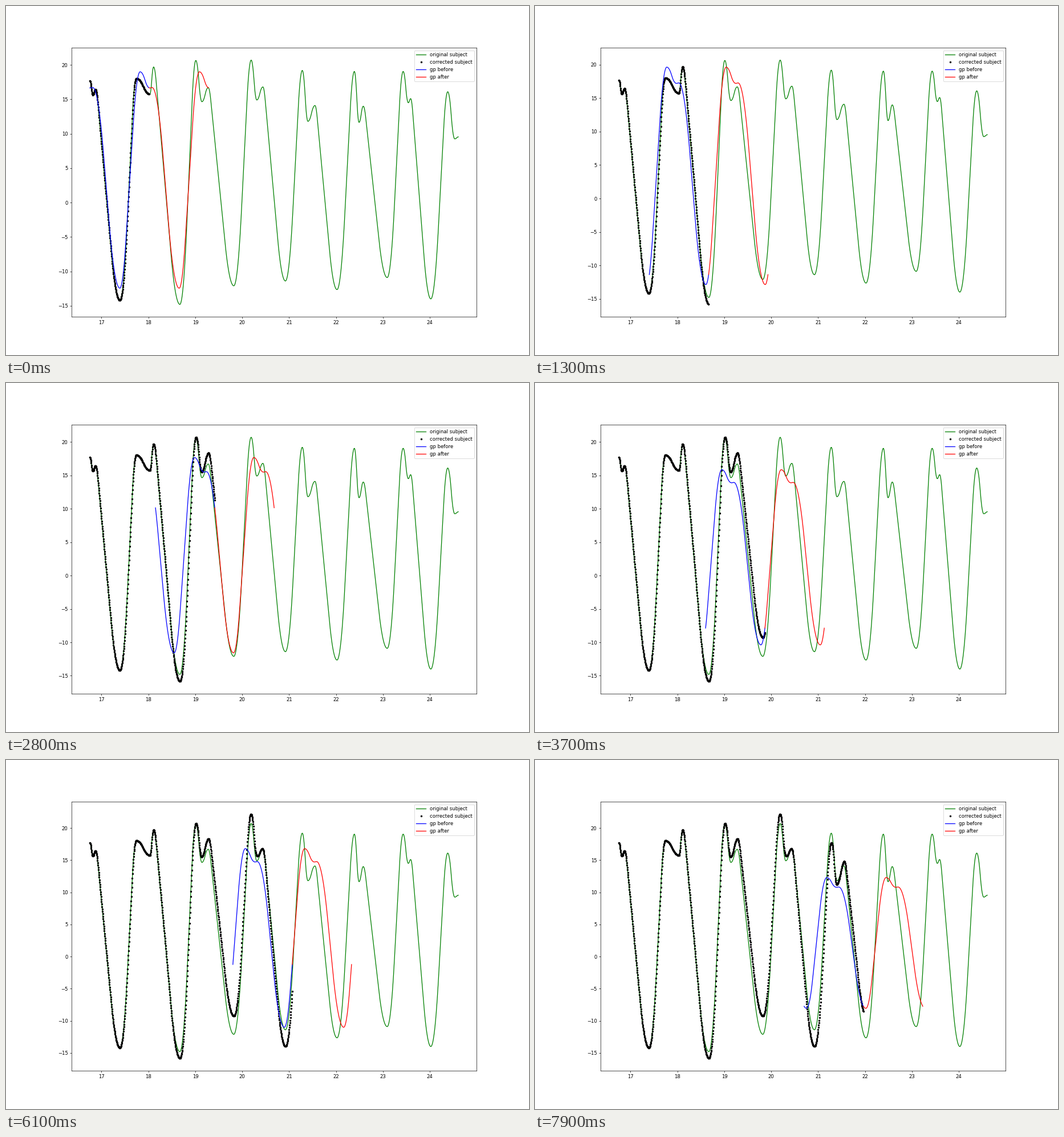
A matplotlib script that plays this animation: 917 px wide and 611 px high, repeating every 8000 ms.

```python
from itertools import cycle

import numpy as np
import matplotlib.pyplot as plt
from matplotlib.animation import FuncAnimation

W, H, DPI = 917, 611, 61.12
FRAMES, INTERVAL = 80, 100
T0, DT, SAMPLES = 16.75, 0.005, 1572
PERIOD = 1.265             # length of one window
STEP = 10                  # samples added per frame
FIRST = 254                # samples shown at the start

# Share of each leg spent speeding up and slowing down:
# peak to dip, dip to bump, bump to trough, trough to peak
SOFT = (.5, .5)
SIGNAL_EASE = [SOFT, SOFT, (.1, .35), (.45, .25)]
WAVE_EASE = [SOFT, SOFT, (.4, .4), (.3, .35)]

# Per beat: peak, dip, bump, trough as (time, value)
BEATS = [
    (16.75, 17.7), (16.815, 15.65), (16.87, 16.45), (17.39, -14.2),
    (17.74, 18.05), (18.03, 15.75), (18.11, 19.7), (18.67, -14.8),
    (19.01, 20.65), (19.14, 14.65), (19.275, 16.7), (19.82, -12.1),
    (20.19, 20.7), (20.31, 14.9), (20.44, 16.8), (20.92, -11.4),
    (21.28, 19.2), (21.4, 11.8), (21.55, 14.1), (22.02, -12.65),
    (22.39, 19.05), (22.49, 11.65), (22.58, 14), (23.09, -10.9),
    (23.43, 19.05), (23.54, 14.5), (23.59, 15.1), (24.02, -14),
    (24.38, 16.1), (24.53, 9.25), (24.61, 9.55)]

# One fitted cycle, from peak to peak
CYCLE = [(0, 1), (.163, .876), (.202, .88), (.659, -.655), (1, 1)]


def ramp(u, a, b):
    """Ease from 0 to 1: speed up over a, steady, slow down over b."""
    v = 1 / (1 - (a + b) / 2)
    return np.where(u < a, v * u**2 / (2 * a),
                    np.where(u > 1 - b, 1 - v * (1 - u)**2 / (2 * b),
                             v * (u - a / 2)))


def path(t, points, eases):
    y = np.zeros_like(t)
    for (t0, y0), (t1, y1), ease in zip(points, points[1:], cycle(eases)):
        on = (t >= t0) & (t <= t1)
        y[on] = y0 + (y1 - y0) * ramp((t[on] - t0) / (t1 - t0), *ease)
    return y


def correction(t):
    """Half sine waves between zero crossings."""
    zeros = [18.37, 19.0, 20.43, 21.48, 22.6]
    y = np.zeros_like(t)
    for a, b, h in zip(zeros, zeros[1:], [-1.05, 2.9, -2.6, 3.5]):
        on = (t >= a) & (t < b)
        y[on] = h * np.sin(np.pi * (t[on] - a) / (b - a))
    return y


def wave(t, k):
    """Fitted wave at step k: its peak drifts back, its height varies."""
    peak = 17.822 - .0038 * k - .0043 * max(k - 48, 0)
    height = np.interp(k, [0, 10, 20, 37, 45, 61, 66, 79],
                       [19, 19.8, 19.3, 15.85, 18.4, 16.8, 19, 12.3])
    return height * path((t - peak) / PERIOD % 1, CYCLE, WAVE_EASE)


time = T0 + DT * np.arange(SAMPLES)
signal = path(time, BEATS, SIGNAL_EASE)
fixed = signal + correction(time)

fig, ax = plt.subplots(figsize=((W + 1e-6) / DPI, (H + 1e-6) / DPI), dpi=DPI)
ax.plot(time, signal, "g", label="original subject")
dots, = ax.plot([], [], "k.", label="corrected subject")
before, = ax.plot([], [], "b", label="gp before")
after, = ax.plot([], [], "r", label="gp after")
ax.legend(loc="upper right", labelspacing=.455)
pad = 0.05 * (time[-1] - time[0])
ax.set_xlim(time[0] - pad, time[-1] + pad)


def update(k):
    n = FIRST + STEP * k
    dots.set_data(time[:n], fixed[:n])
    t = T0 + DT * STEP * k + np.linspace(0, PERIOD, FIRST)
    y = wave(t, k)
    before.set_data(t, y)
    after.set_data(t + PERIOD, y)
    shown = np.concatenate([signal, fixed[:n]])
    lo, hi = shown.min(), shown.max()
    margin = 0.05 * (hi - lo)
    ax.set_ylim(lo - margin, hi + margin)
    return dots, before, after


anim = FuncAnimation(fig, update, frames=FRAMES, interval=INTERVAL,
                     repeat=True, repeat_delay=0)
plt.show()
```
